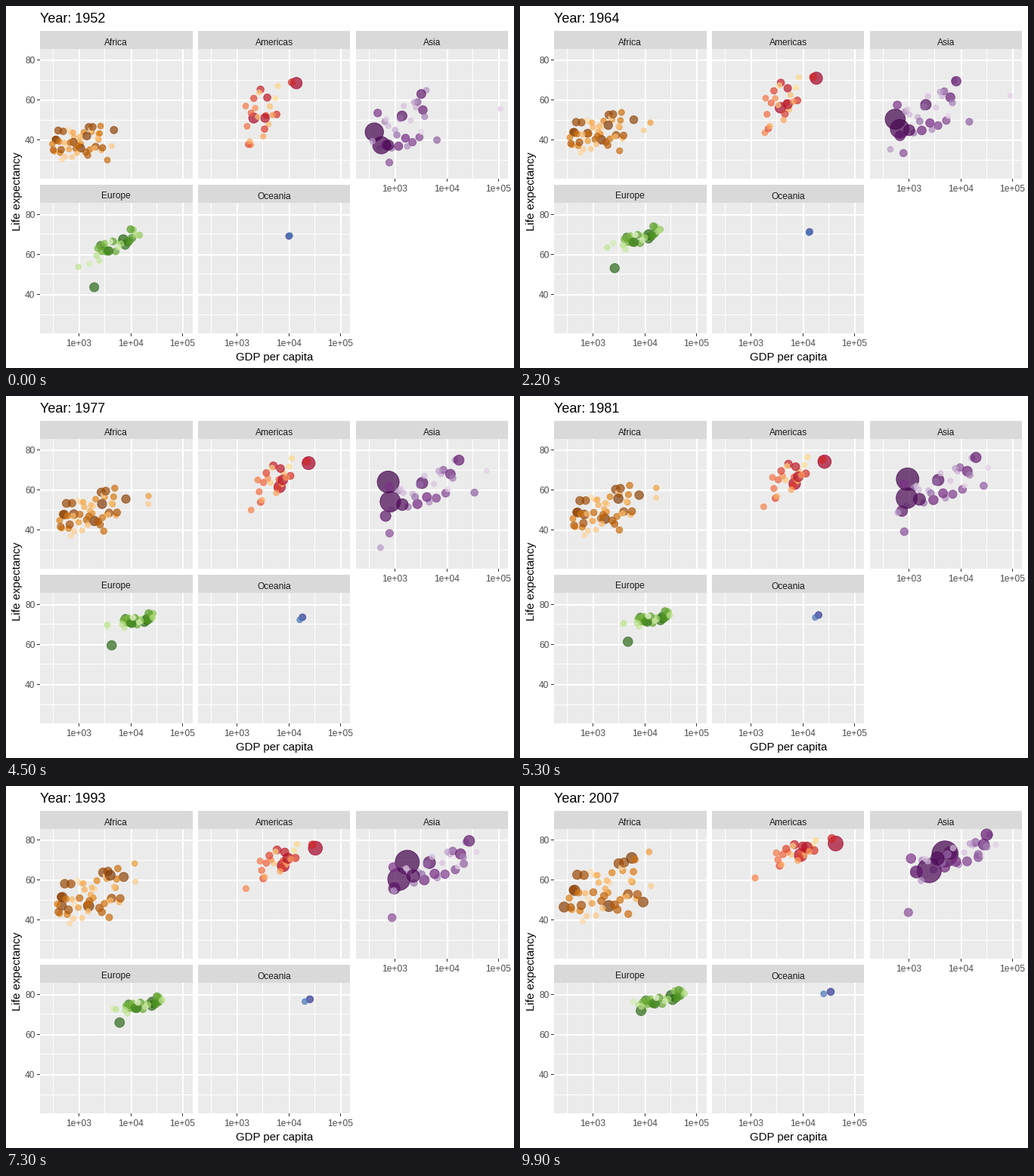
These frames come from a looping animation (672x480 px, 10000 ms). A matplotlib script:

```python
import numpy as np
import matplotlib.pyplot as plt
from matplotlib.animation import FuncAnimation
from matplotlib.colors import LinearSegmentedColormap
from matplotlib.patches import Rectangle

plt.rcParams["font.family"] = "Liberation Sans"

W, H, DPI = 672, 480, 96
FRAMES, INTERVAL = 100, 100
START, MID, END = 1952, 1977, 2007
YEARS = np.linspace(START, END, FRAMES)
PW, PH = 201.67, 172.5          # panel size in pixels
X_MIN, X_SPAN = 2.2487, 2.9401  # log10 of income
Y_MAX, Y_SPAN = 85.55, 64.9
POP_MAX = 1319                  # millions

rng = np.random.default_rng(11)

# clouds: mean and spread of log income, mean and spread of life
# expectancy, and their correlation, at START, MID and END.
# leaders: population rank -> path of (year, income, life).
# pops: the largest populations, then a geometric tail (first, ratio).
PANELS = [
    dict(name="Africa", col=0, row=0, count=52, growth=.27,
         pops=([], 120, .9),
         ramp=["#7F3B08", "#B35806", "#E08214", "#FDB863", "#FEE0B6"],
         clouds=[(2.97, .28, 39, 4.6, .3), (3.18, .32, 49, 6, .55), (3.2, .38, 55, 8, .45)],
         leaders={
             0: [(1952, 1077, 36), (1977, 1982, 44.5), (1987, 1385, 47), (2007, 2014, 47)],
             1: [(1952, 1419, 42), (1977, 2785, 53), (2007, 5581, 71)],
             3: [(1952, 781, 39), (1977, 796, 48), (2007, 278, 46.5)],
             4: [(1952, 4725, 45), (1977, 8028, 55.5), (1992, 7225, 62), (2007, 9270, 49)],
             19: [(1952, 3521, 30), (1977, 3009, 39.5), (2007, 4797, 43)],
             32: [(1952, 2388, 43), (1967, 18773, 50), (1977, 21951, 57),
                  (1987, 11771, 66), (2007, 12057, 74)],
             44: [(1952, 4293, 37), (1977, 21746, 53), (1987, 11864, 60), (2007, 13206, 57)],
         }),
    dict(name="Americas", col=1, row=0, count=25, growth=.45,
         pops=([301, 190, 109], 45, .84),
         ramp=["#A50026", "#D73027", "#F46D43", "#FDAE61", "#FEE090"],
         clouds=[(3.48, .18, 53, 8, .4), (3.73, .19, 65, 5.5, .6), (3.87, .22, 73.5, 3.2, .6)],
         leaders={
             0: [(1952, 13990, 68.4), (1977, 24073, 73.4), (2007, 42952, 78.2)],
             1: [(1952, 2109, 51), (1977, 6660, 61.5), (2007, 9066, 72.4)],
             2: [(1952, 3478, 51), (1977, 7675, 65), (2007, 11978, 76.2)],
             5: [(1952, 11367, 68.8), (1977, 22091, 74.2), (2007, 36319, 80.7)],
             14: [(1952, 1840, 37.6), (1977, 1875, 50), (2007, 1202, 61)],
         }),
    dict(name="Asia", col=2, row=0, count=33, growth=.41,
         pops=([1319, 1110], 224, .84),
         ramp=["#40004B", "#762A83", "#9970AB", "#C2A5CF", "#E7D4E8"],
         clouds=[(3.17, .31, 48, 8, .5), (3.57, .42, 61, 6.5, .7), (3.85, .5, 72, 5, .8)],
         leaders={
             0: [(1952, 400, 44), (1964, 540, 50), (1971, 660, 62.7), (1977, 741, 64),
                 (1992, 1656, 68.7), (2007, 4959, 73)],
             1: [(1952, 547, 37.4), (1977, 813, 54.2), (1992, 1164, 60.2), (2007, 2452, 64.7)],
             2: [(1952, 750, 37.5), (1977, 1383, 52.7), (2007, 3541, 70.7)],
             4: [(1952, 684, 37.5), (1977, 660, 47), (2007, 1391, 64)],
             5: [(1952, 3217, 63), (1972, 14779, 73.4), (1992, 26825, 79.4), (2007, 31656, 82.6)],
             12: [(1952, 779, 28.8), (1977, 786, 38.4), (2007, 975, 43.8)],
             14: [(1952, 6460, 40), (1977, 34168, 58.7), (1987, 21198, 66.3), (2007, 21655, 72.8)],
             22: [(1952, 368, 39.4), (1977, 525, 31.2), (1982, 624, 51), (2007, 1714, 59.7)],
             31: [(1952, 108382, 55.6), (1964, 89000, 62), (1972, 109348, 67.7),
                  (1982, 31354, 71.3), (2007, 47307, 77.6)],
         }),
    dict(name="Europe", col=0, row=1, count=30, growth=.75,
         pops=([], 88, .87),
         ramp=["#276419", "#4D9221", "#7FBC41", "#B8E186", "#E6F5D0"],
         clouds=[(3.72, .22, 65.5, 4.2, .85), (4.13, .17, 72.3, 1.9, .7), (4.35, .24, 77.7, 2.6, .85)],
         leaders={
             0: [(1952, 7144, 67.5), (1977, 20513, 72.5), (2007, 32170, 79.4)],
             1: [(1952, 1969, 43.6), (1964, 2600, 53), (1977, 4269, 59.5), (2007, 8458, 71.8)],
             17: [(1952, 14734, 69.6), (1977, 26982, 75.4), (2007, 37506, 81.7)],
             23: [(1952, 974, 53.8), (1964, 1850, 63.3), (1977, 3528, 69.9), (2007, 7446, 74.9)],
             26: [(1952, 1601, 55.2), (1964, 2450, 65.5), (1977, 3533, 68.9), (2007, 5937, 76.4)],
         }),
    dict(name="Oceania", col=1, row=1, count=2, growth=.45,
         pops=([20], 4, 1), ramp=["#313695", "#4575B4"], clouds=[],
         leaders={
             0: [(1952, 10040, 69.1), (1977, 18334, 73.5), (2007, 34435, 81.2)],
             1: [(1952, 10557, 69.4), (1977, 16234, 72.2), (2007, 25185, 80.2)],
         }),
]


def corner(col, row):
    return 45 + 209 * col, 56.7 + 204.7 * row


def px(log_income, left):
    return left + (log_income - X_MIN) / X_SPAN * PW


def py(life, top):
    return top + (Y_MAX - life) / Y_SPAN * PH


def diameter(pop):
    """Bubble diameter in points."""
    size = 2 + 10 * np.sqrt(pop / POP_MAX)
    return .75 * (size * 2.845 + .945) - .35


def leader_track(path):
    years, income, life = zip(*path)
    return np.interp(YEARS, years, np.log10(income)), np.interp(YEARS, years, life)


def crowd_track(u, v, clouds):
    """Keep one relative place (u, v) while the cloud drifts and spreads."""
    income = [m + s * u for m, s, *_ in clouds]
    life = [m + s * (r * u + np.sqrt(1 - r * r) * v) for *_, m, s, r in clouds]
    knots = (START, MID, END)
    return np.interp(YEARS, knots, income), np.interp(YEARS, knots, life)


def spread(n):
    """Evenly spaced scores of unit variance in random order."""
    return rng.permutation(np.linspace(-1.73, 1.73, n))


fig = plt.figure(figsize=(W / DPI, H / DPI), dpi=DPI, facecolor="white")
ax = fig.add_axes([0, 0, 1, 1])
ax.set(xlim=(0, W), ylim=(H, 0))
ax.axis("off")


def box(x, y, w, h, color):
    ax.add_patch(Rectangle((x, y), w, h, fc=color, lw=0, zorder=1))


def label(x, y, s, size, color="black", **kw):
    return ax.text(x, y, s, size=size, color=color, va="baseline", **kw)


def draw_panel(name, col, row):
    left, top = corner(col, row)
    y0, y1 = round(top), round(top + PH)
    w = 202 - (col > 0)
    box(left, y0 - 24, w, 24, "#D9D9D9")
    box(left, y0, w, y1 - y0, "#EBEBEB")
    label(left + PW / 2, y0 - 5.5, name, 9, "#1A1A1A", ha="center")
    for life in range(30, 81, 10):
        y, major = int(py(life, top)), life % 20 == 0
        box(left, y, w, 1 + major, "white")
        if major and col == 0:
            box(left - 4, y, 4, 1, "#333333")
            label(left - 6.6, y + 5, str(life), 9, "#4D4D4D", ha="right")
    for half in range(5, 11):
        x, major = int(px(half / 2, left)), half % 2 == 0
        box(x, y0, 1 + major, y1 - y0, "white")
        if major and (row == 1 or col == 2):
            box(x, y1, 1, 4, "#333333")
            label(x + .5, y1 + 17, f"1e+0{half // 2}", 9, "#4D4D4D", ha="center")


def bubbles(panel):
    """Yield x, y, area over time and the colour of each bubble."""
    left, top = corner(panel["col"], panel["row"])
    n, leaders = panel["count"], panel["leaders"]
    head, tail, ratio = panel["pops"]
    cmap = LinearSegmentedColormap.from_list(panel["name"], panel["ramp"])
    us, vs = spread(n), spread(n)
    for rank in rng.permutation(n):
        if rank in leaders:
            income, life = leader_track(leaders[rank])
        else:
            income, life = crowd_track(us[rank], vs[rank], panel["clouds"])
        pop = head[rank] if rank < len(head) else tail * ratio ** (rank - len(head))
        size = np.interp(YEARS, (START, END), (diameter(pop * panel["growth"]), diameter(pop)))
        yield px(income, left), py(life, top), size ** 2, cmap(rank / (n - 1))


parts = []
for panel in PANELS:
    draw_panel(panel["name"], panel["col"], panel["row"])
    parts += bubbles(panel)
xs, ys, areas, colors = zip(*parts)
xs, ys, areas = (np.array(a).T for a in (xs, ys, areas))

label(355, 470, "GDP per capita", 11.25, ha="center")
label(19, 245.5, "Life expectancy", 11.25, ha="center", rotation=90, rotation_mode="anchor")
title = label(45, 22, "", 13.5)
dots = ax.scatter(xs[0], ys[0], s=areas[0], c=colors, edgecolors=colors,
                  linewidths=.71, alpha=.7, zorder=3)


def update(i):
    title.set_text(f"Year: {round(YEARS[i])}")
    dots.set_offsets(np.column_stack((xs[i], ys[i])))
    dots.set_sizes(areas[i])
    return title, dots


anim = FuncAnimation(fig, update, frames=FRAMES, interval=INTERVAL,
                     repeat=True, repeat_delay=0)
plt.show()
```
